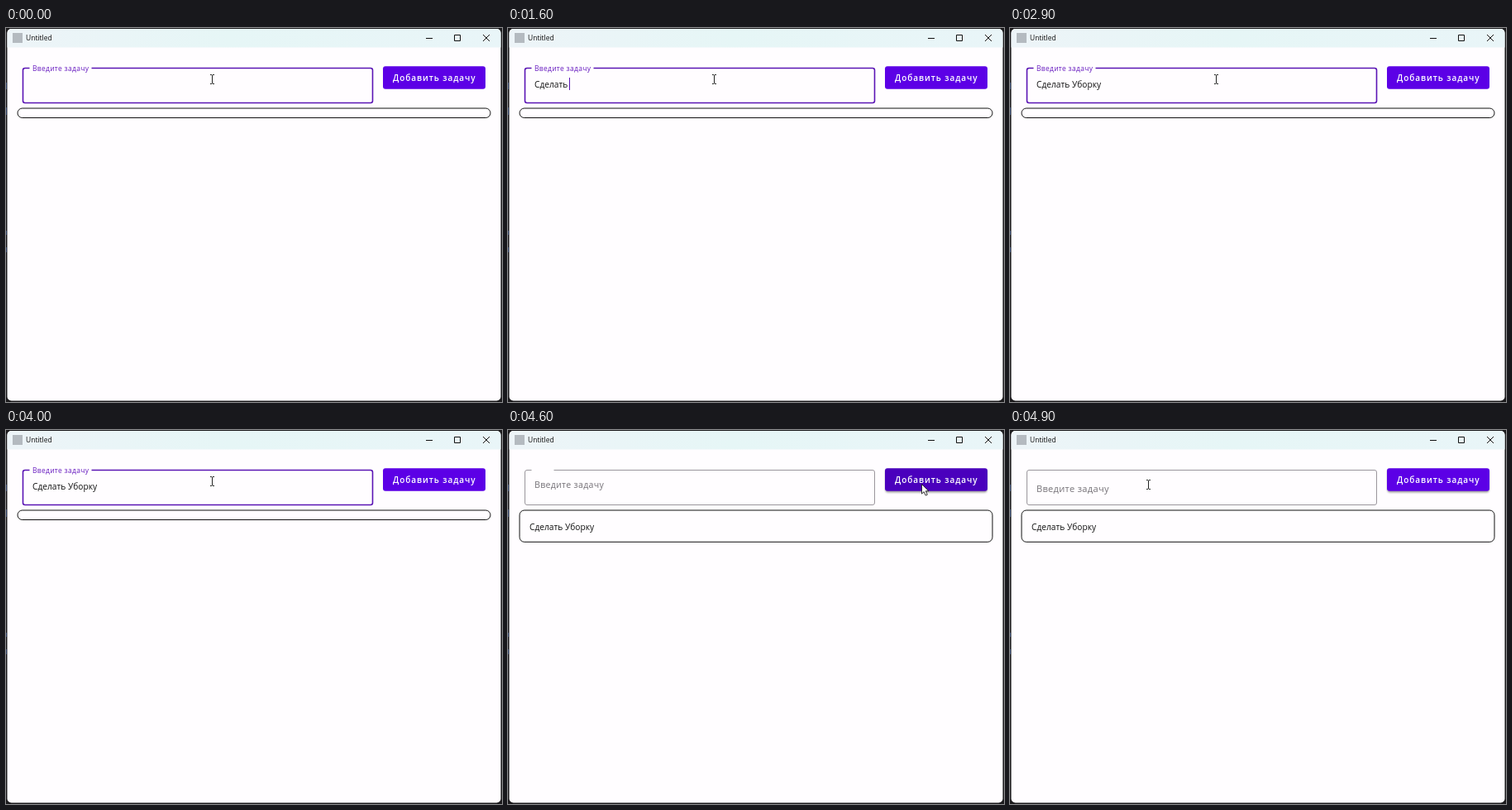
Write an HTML page that moves like this. It is 600 px wide and 452 px high and loops after 5 s.

```html
<!DOCTYPE html>
<html lang="ru">
<head>
<meta charset="utf-8">
<title>Task list</title>
<style>
  html, body { margin: 0; width: 100%; height: 100%; overflow: hidden; background: #1b1a1c; }
  svg { display: block; width: 600px; height: 452px; }
  text { font-family: "Open Sans", "Noto Sans", sans-serif; fill: #111; white-space: pre; }
  .body { font-size: 10.2px; }
  .line { fill: none; stroke: #111; }
</style>
</head>
<body>
<svg viewBox="0 0 600 452">
  <defs>
    <linearGradient id="bar">
      <stop offset="0" stop-color="#edf4f8"/>
      <stop offset=".45" stop-color="#e6f6f6"/>
      <stop offset="1" stop-color="#e9f5f8"/>
    </linearGradient>
    <clipPath id="win"><rect x="1.5" y="1" width="597" height="449.5" rx="5"/></clipPath>
    <filter id="soft" x="-10%" y="-30%" width="120%" height="170%"><feGaussianBlur stdDeviation="1.2"/></filter>
  </defs>

  <rect width="600" height="452" fill="#1b1a1c"/>
  <path d="M0 66v8M0 96v9M0 245v5M0 265v6" stroke="#34486e" stroke-width="2"/>

  <g clip-path="url(#win)">
    <rect width="600" height="452" fill="#fffdff"/>
    <rect width="600" height="23.5" fill="url(#bar)"/>
  </g>
  <rect x="8" y="6" width="12" height="12" fill="#b4bac0"/>
  <text x="24" y="15" font-size="8.5">Untitled</text>
  <path class="line" d="M508 12.5h8M542.5 8.5h7v7h-7zM577 8l8 8M585 8l-8 8"/>

  <rect id="field" x="20.5" y="48.5" width="423" height="42" rx="2.5" fill="none"/>
  <rect id="gap" x="28.5" y="46" height="5" fill="#fffdff"/>
  <text id="label" x="32">Введите задачу</text>
  <text id="typed" class="body" x="32" y="72"></text>
  <rect id="caret" y="60" width="1" height="15" fill="#5a14b4"/>

  <rect id="shadow" x="456.5" y="48" width="123" height="27.5" rx="3" filter="url(#soft)" opacity=".4"/>
  <rect id="button" x="456" y="46.3" width="124" height="27.5" rx="3"/>
  <text x="468" y="64" font-size="10" font-weight="600" letter-spacing=".95" style="fill:#fff">Добавить задачу</text>

  <rect id="list" class="line" x="14" y="97" width="572" rx="5.8"/>
  <text id="task" class="body" x="26" y="120.5">Сделать Уборку</text>

  <g id="beam" fill="none">
    <path d="M-3 -6h2l1 1l1 -1h2M-3 6h2l1 -1l1 1h2M0 -5v10" stroke="#fff" stroke-width="2.4" opacity=".7"/>
    <path d="M-2.5 -5.5h1.8l.7 .7l.7 -.7h1.8M-2.5 5.5h1.8l.7 -.7l.7 .7h1.8M0 -5v10" stroke="#222"/>
  </g>
  <path id="arrow" d="M0 0v11.6l2.7 -2.5l2 4.5l2.1 -.9l-2 -4.4h3.7z" fill="#fff" stroke="#222" stroke-width=".9"/>
</svg>
<script>
const LOOP = 5000;
const TASK = "Сделать Уборку";
const el = id => document.getElementById(id);
const set = (id, attrs) => {
  for (const name in attrs) el(id).setAttribute(name, attrs[name]);
};
const show = (id, on) => set(id, { visibility: on ? "visible" : "hidden" });

// Each track is a list of [start in ms, value], held until the next start.
const letters = [[0, 0], [600, 1], [1000, 3], [1100, 4], [1200, 5], [1300, 6], [1500, 7],
                 [1600, 8], [1800, 9], [2000, 11], [2400, 12], [2700, 14], [4600, 0]];
const carets = [[0, false], [1000, true], [2900, false], [4200, true], [4600, false]];
const fills = [[0, "#5c00e6"], [4300, "#5200d0"], [4600, "#4a00bd"], [4700, "#5200d0"], [4800, "#5c00e6"]];
const pointers = [[0, ["beam", 249.5, 62]], [4200, ["beam", 395.5, 66]], [4300, ["arrow", 500.5, 65.5]],
                  [4800, ["beam", 320.5, 67]], [4900, ["beam", 167.5, 66]]];
// Label: baseline, size, width of the notch in the outline
const labels = [[0, [51.8, 8.5, 75]], [4600, [70, 10.6, 27]], [4700, [74.5, 11.1, 0]]];

const at = (track, t) => track.reduce((value, [start, next]) => t >= start ? next : value, track[0][1]);

function draw(t) {
  const added = t >= 4600;
  const typed = el("typed");
  typed.textContent = TASK.slice(0, at(letters, t));
  set("caret", { x: Math.round(31.6 + typed.getComputedTextLength()) });
  show("caret", at(carets, t));

  const [y, size, notch] = at(labels, t);
  set("label", { y, "font-size": size, "letter-spacing": 0.3 });
  el("label").style.fill = added ? "#777379" : "#681cc0";
  set("gap", { width: notch });
  set("field", { stroke: added ? "#9a969c" : "#5a14b4", "stroke-width": added ? 1 : 1.6 });

  set("button", { fill: at(fills, t) });
  show("shadow", t >= 4300);
  set("list", { height: added ? 38.3 : 11.5 });
  show("task", added);

  const [kind, px, py] = at(pointers, t);
  for (const id of ["beam", "arrow"]) show(id, id === kind);
  set(kind, { transform: `translate(${px} ${py})` });
}

function tick() {
  draw(performance.now() % LOOP);
  requestAnimationFrame(tick);
}
tick();
</script>
</body>
</html>
```
